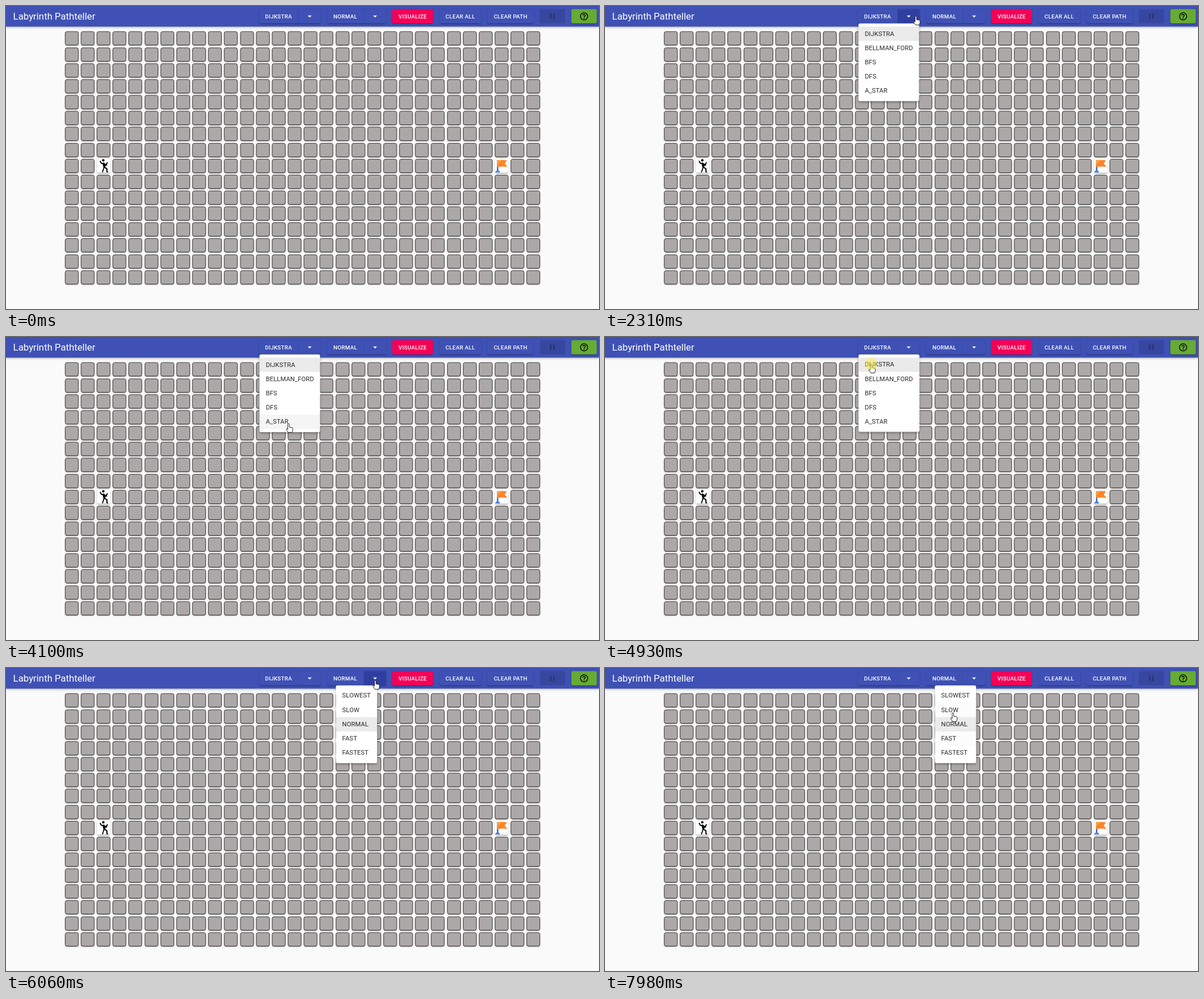
An HTML page that plays this animation: 1047 by 535 pixels, repeating every 8000 ms.

```html
<!DOCTYPE html>
<html lang="en">
<head>
<meta charset="utf-8">
<title>Labyrinth Pathteller</title>
<style>
  html, body { margin: 0; width: 100%; height: 100%; overflow: hidden; background: #fafafa; }
  body { position: relative; font-family: Roboto, Arial, sans-serif; }
  div, header, h1 { box-sizing: border-box; }
  #stage { position: absolute; left: 0; top: 0; width: 1495.7px; height: 764.3px; transform: scale(.7); transform-origin: 0 0; }
  header {
    position: absolute; left: 0; top: 0; width: 100%; height: 52px; padding: 0 6px 0 18px;
    display: flex; align-items: center; gap: 15.3px; background: #3f51b5; color: #fff;
  }
  header, .menu { box-shadow: 0 2px 4px -1px rgba(0,0,0,.2), 0 4px 5px rgba(0,0,0,.14), 0 1px 10px rgba(0,0,0,.12); }
  .raised, .cell { box-shadow: 0 3px 1px -2px rgba(0,0,0,.2), 0 2px 2px rgba(0,0,0,.14), 0 1px 5px rgba(0,0,0,.12); }
  h1 { margin: 0 auto 0 0; font: 400 24px/32px Roboto, Arial, sans-serif; white-space: nowrap; }
  .group { position: relative; display: flex; border-radius: 4px; }
  .btn {
    display: flex; align-items: center; justify-content: center; height: 36px; min-width: 64px; padding: 0 16px;
    border-radius: 4px; font-size: 14px; font-weight: 500; letter-spacing: .4px; white-space: nowrap;
  }
  .btn svg { width: 24px; height: 24px; fill: currentColor; }
  .label { border-right: 1px solid #303f9f; border-radius: 4px 0 0 4px; }
  .drop { min-width: 40px; border-radius: 0 4px 4px 0; }
  .main { background: #f50057; }
  .off { background: rgba(0,0,0,.12); color: rgba(0,0,0,.26); }
  .help { background: #66ab33; color: #000; }
  .cell { position: absolute; width: 34px; height: 35px; border: 1px solid #000; border-radius: 5px; background: #aca8a7; }
  .mark { border-color: transparent; background: #fff; }
  .menu {
    position: absolute; left: 50%; top: 100%; padding: 8px 0; background: #fff; border-radius: 4px;
    transform: translateX(-50%); transform-origin: center top;
  }
  .item { padding: 0 16px; font-size: 16px; line-height: 36px; letter-spacing: .15px; color: rgba(0,0,0,.84); white-space: nowrap; }
  .art { position: absolute; top: 269px; width: 26px; height: 26px; }
  #ring { position: absolute; left: -11px; top: -11px; width: 21px; height: 21px; border-radius: 50%; background: rgba(255,235,59,.5); }
  #pointer { position: absolute; left: 0; top: 0; width: 1px; height: 1px; overflow: visible; }
  #pointer path { fill: #fff; stroke: #111; stroke-width: .9; stroke-linejoin: round; }
</style>
</head>
<body>
<div id="stage"><header><h1>Labyrinth Pathteller</h1></header></div>
<svg class="art" style="left:160.5px" fill="none" stroke="#000" stroke-linecap="round" stroke-linejoin="round">
  <circle cx="10.8" cy="3.4" r="2.2" fill="#000" stroke="none"/>
  <path d="M5.4 5.2L7.4 8.8L11 9" stroke-width="2"/>
  <path d="M11.2 9.2L12.8 15.5" stroke-width="3.6"/>
  <path d="M12.5 9.5L15.4 11.2L18 7.6M13.6 13L17 11.4M12 16L10.8 20L9.4 24" stroke-width="1.8"/>
  <path d="M13.2 16L17.2 18.4L17.2 23.8H18.4" stroke-width="2"/>
</svg>
<svg class="art" style="left:862px">
  <path d="M4.8 3H7.2V24H4.8z" fill="#2f62c4"/>
  <path d="M2.2 24.8V23L4.2 21.6H8L10 23V24.8z" fill="#4a7de0"/>
  <path d="M5 3.4Q12 2 22.6 3.6L18.6 9L23.4 15.2Q14 13.8 5 15.4z" fill="#fb852d"/>
  <path d="M5 3.4Q10 2.3 14 2.8L5 11z" fill="#fda136"/>
</svg>
<svg id="pointer">
  <path d="M0 0V11.8L2.7 9.3L4.5 13.4L6.4 12.6L4.7 8.6H8.2z"/>
  <path d="M-1.5 1.3a1.3 1.3 0 0 1 2.6 0V6l5 1.1q1.4.4 1.3 1.8L7 12.5L6 15.5H-.6L-4 10.6q-.6-1.2.5-1.6q.8-.2 1.5.7l.5.6z"/>
</svg>
<div id="ring"></div>
<script>
const LOOP = 8000;
const [PICK, CHOOSE, SPEED] = [1860, 4850, 5640];   // click times
const COLS = 30, ROWS = 16, PITCH = 40.16;

const stage = document.getElementById('stage');
const header = document.querySelector('header');
const pointer = document.getElementById('pointer');
const ring = document.getElementById('ring');
const [arrowShape, handShape] = pointer.children;

const icon = d => `<svg viewBox="0 0 24 24"><path d="${d}"/></svg>`;
const ARROW = icon('M7 10l5 5 5-5z');
const PAUSE = icon('M6 19h4V5H6v14zm8-14v14h4V5h-4z');
const HELP = icon('M11 18h2v-2h-2v2zm1-16C6.48 2 2 6.48 2 12s4.48 10 10 10 10-4.48 10-10S17.52 2 12 2zm0 18c-4.41 0-8-3.59-8-8s3.59-8 8-8 8 3.59 8 8-3.59 8-8 8zm0-14c-2.21 0-4 1.79-4 4h2c0-1.1.9-2 2-2s2 .9 2 2c0 2-3 1.75-3 5h2c0-2.25 3-2.5 3-5 0-2.21-1.79-4-4-4z');

function add(parent, cls, html = '') {
  const el = document.createElement('div');
  el.className = cls;
  el.innerHTML = html;
  parent.append(el);
  return el;
}

const cells = [];
for (let r = 0; r < ROWS; r++) {
  for (let c = 0; c < COLS; c++) {
    const cell = add(stage, r === 8 && (c === 2 || c === 27) ? 'cell mark' : 'cell');
    cell.style.left = 148.8 + c * PITCH + 'px';
    cell.style.top = 64.4 + r * PITCH + 'px';
    cells.push(cell);
  }
}
stage.append(header);

const buttons = [], menus = [];
function dropdown(names, chosen, open, close) {
  const group = add(header, 'group raised');
  buttons.push(add(group, 'btn label', names[chosen]), add(group, 'btn drop', ARROW));
  const el = add(group, 'menu');
  menus.push({ el, chosen, open, close, items: names.map(name => add(el, 'item', name)) });
}
dropdown(['DIJKSTRA', 'BELLMAN_FORD', 'BFS', 'DFS', 'A_STAR'], 0, PICK + 90, CHOOSE + 80);
dropdown(['SLOWEST', 'SLOW', 'NORMAL', 'FAST', 'FASTEST'], 2, SPEED + 90, Infinity);
add(header, 'btn raised main', 'VISUALIZE');
buttons.push(add(header, 'btn raised', 'CLEAR ALL'), add(header, 'btn raised', 'CLEAR PATH'));
add(header, 'btn off', PAUSE);
add(header, 'btn raised help', HELP);

// Boxes are measured once, while nothing is scaled or hidden
const measure = els => els.map(el => ({ el, box: el.getBoundingClientRect() }));
const buttonBoxes = measure(buttons), cellBoxes = measure(cells);
for (const m of menus) m.boxes = measure([...m.items, m.el]);

// Pointer moves: start, end, x, y
const home = [982, 470];
const moves = [
  [630, 980, 625, 20], [980, 1200, 561, 12], [1200, 1500, 549, 18],
  [2440, 2730, 532, 51], [2730, 3490, 463, 132], [3540, 3950, 499, 153],
  [4100, 4850, 470, 48], [4930, 5450, 652, 22],
  [6700, 7040, 627, 60], [7040, 7500, 602, 134], [7710, 7980, 614.5, 79]
];

const clamp = v => Math.max(0, Math.min(1, v));
const mix = (a, b, p) => a + (b - a) * p;
const smooth = p => p * p * (3 - 2 * p);

function place(t) {
  if (t < moves[0][0]) return null;
  let [x, y] = home;
  for (const [from, to, tx, ty] of moves) {
    const p = smooth(clamp((t - from) / (to - from)));
    x = mix(x, tx, p);
    y = mix(y, ty, p);
  }
  return [x, y];
}

// The part under the pointer at time t
function under(t) {
  const pos = place(t);
  if (!pos) return null;
  const x = pos[0], y = pos[1] + 2;
  const open = menus.filter(m => t >= m.open && t < m.close).flatMap(m => m.boxes);
  const found = [...open, ...buttonBoxes, ...cellBoxes].find(({ box }) =>
    x >= box.left && x < box.right && y >= box.top && y < box.bottom);
  return found ? found.el : null;
}

function draw(t) {
  // A hover fade is the share of recent moments spent over a part
  const recent = Array.from({ length: 10 }, (_, i) => under(t - i * 22));
  const hover = el => recent.filter(e => e === el).length / recent.length;

  for (const el of buttons) el.style.background = `rgba(48,63,159,${hover(el)})`;
  for (const { el, items, chosen, open, close } of menus) {
    const grow = 1 - (1 - clamp((t - open) / 220)) ** 2;
    const p = grow * (1 - clamp((t - close) / 180));
    const s = mix(.75, 1, p);
    el.style.opacity = p;
    el.style.transform = `translateX(-50%) scale(${s}, ${s * s})`;
    items.forEach((item, i) => {
      item.style.background = `rgba(0,0,0,${i === chosen ? .08 : .04 * hover(item)})`;
    });
  }

  const pos = place(t);
  const clicked = [PICK, CHOOSE, SPEED].some(c => t >= c && t < c + 200);
  pointer.style.display = pos ? '' : 'none';
  ring.style.display = clicked ? '' : 'none';
  if (!pos) return;
  pointer.style.transform = ring.style.transform = `translate(${pos[0]}px, ${pos[1]}px)`;
  const hand = recent[0] !== null;
  handShape.style.display = hand ? '' : 'none';
  arrowShape.style.display = hand ? 'none' : '';
}

const start = performance.now();
function tick() {
  draw((performance.now() - start) % LOOP);
  requestAnimationFrame(tick);
}
tick();
</script>
</body>
</html>
```
